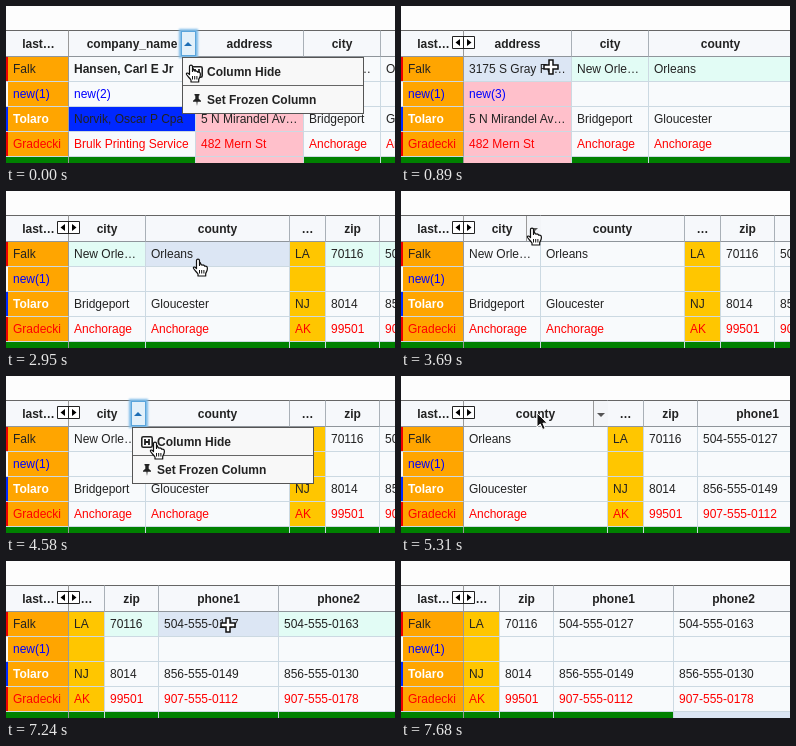
Animation of 389x157 px, one loop 8300 ms. Source, as an HTML page:

```html
<!DOCTYPE html>
<html lang="en">
<head>
<meta charset="utf-8">
<title>Hiding grid columns</title>
<style>
html, body { margin: 0; width: 100%; height: 100%; overflow: hidden; background: #fdfdfd; }
body { position: relative; font: 12px/25px "Liberation Sans", Arial, sans-serif; color: #222; }
#stage { position: absolute; left: 0; top: 0; width: 389px; height: 157px; overflow: hidden; }
#stage div { box-sizing: border-box; white-space: nowrap; }
#view { position: absolute; left: 63px; top: 24px; width: 326px; height: 133px; overflow: hidden; }
#strip { position: absolute; left: 0; top: 0; }
#frozen { position: absolute; left: 0; top: 24px; width: 63px; height: 133px; overflow: hidden; }
.col { position: absolute; top: 0; }
.head { height: 27px; line-height: 26px; text-align: center; font-weight: bold; background: #f6f8fb;
  border: solid #a9b0b7; border-width: 0 1px 1px 0; border-top: 1px solid #666; border-bottom-color: #8f959b; overflow: hidden; }
.cell { height: 25px; line-height: 25px; padding-left: 5px; background: #f8fafc; overflow: hidden;
  border: solid #ccd9e2; border-width: 0 1px 1px 0; }
#frozen .head, #frozen .cell { border-right-color: #999; }
.r1 { color: #00f; }
.r3 { color: #f00; }
.r4 { background: #008000; }
.rowHover { background: #e2fcf5; }
.cellHover { background: #dce6f4 !important; }
.edge { position: absolute; left: 0; width: 2px; height: 24px; }
#btn { position: absolute; top: 25px; width: 15px; height: 25px; background: #f3f5f8; border-left: 1px solid #999; }
#btn i { position: absolute; left: 3px; top: 12px; border: 4px solid transparent; border-top-color: #555; border-bottom: 0; }
#btn.open { background: #e2f0fa; border: 1px solid #5aa5dc; box-shadow: 0 0 2px 2px #7dbbe8; }
#btn.open i { left: 2px; top: 10px; border-top: 0; border-bottom: 4px solid #1b6db5; }
#menu { position: absolute; top: 51px; width: 182px; height: 57px; background: #f8f8f8; border: 1px solid #555;
  font-weight: bold; color: #222; }
#menu div { position: relative; height: 27px; line-height: 28px; padding-left: 24px; }
#menu div + div { border-top: 1px solid #666; }
#menu svg { position: absolute; left: 8px; top: 8px; }
#sizer { position: absolute; left: 51px; top: 30px; }
#cursor { position: absolute; left: 0; top: 0; overflow: visible; }
</style>
</head>
<body>
<div id="stage">
  <div id="view"><div id="strip"></div></div>
  <div id="frozen"></div>
  <svg id="sizer" width="23" height="13">
    <path d="M.5.5h22v12h-22zM11.500.5v12" fill="#fff" stroke="#222"/>
    <path d="M8 3v7L3.500 6.500zM15 3v7L19.500 6.500z"/>
  </svg>
  <div id="btn"><i></i></div>
  <div id="menu">
    <div><svg width="12" height="12"><rect x=".8" y=".8" width="10.400" height="10.400" rx="1.500" fill="#fff" stroke="#222" stroke-width="1.600"/><path d="M4 3v6M8 3v6M4 6h4" stroke="#222" stroke-width="1.800"/></svg>Column Hide</div>
    <div><svg width="12" height="12"><path d="M3.500 0h5v1.200l-.8.6v3l2.300 2v1H6.600L6 12l-.6-4.200H2v-1l2.300-2v-3l-.8-.6z" fill="#222"/></svg>Set Frozen Column</div>
  </div>
  <svg id="cursor" width="1" height="1">
    <g id="hand"><path d="M-1.500 1.500C-1.500-.3 1.500-.3 1.500 1.500V6.500C2-.0 2 5.500 4 6.200 5 5.700 6.300 6 6.700 7.200 8.500 6.800 9.400 7.800 9.400 9.500 9.400 12 8.200 13 7.700 14.500V17H0V15C-1.500 13-3.500 11-4.500 9.500-5 8.200-3.500 7.500-2.500 8.500L-1.500 9.500Z" fill="#fff" stroke="#111" stroke-width="1.200" stroke-linejoin="round"/><path d="M1.500 11v3.500M3.700 11v3.500M5.900 11v3.500" stroke="#111"/></g>
    <g id="cross"><path d="M-2-7h4v5h5v4h-5v5h-4v-5h-5v-4h5z" fill="#fff" stroke="#111" stroke-width="1.500"/></g>
    <g id="arrow"><path d="M0 0V14L3.300 11 5.700 16.500 8.200 15.400 5.900 10.200H10.400Z" fill="#111" stroke="#fff"/></g>
  </svg>
</div>
<script>
const LOOP = 8300, LEFT = 63, TOP = 50, ROW = 25;
const $ = id => document.getElementById(id);

const columns = [
  { name: "company_name", w: 127, rows: ["Hansen, Carl E Jr", "new(2)", "Norvik, Oscar P Cpa", "Brulk Printing Service"] },
  { name: "address", w: 108, bg: "#ffc0cb", rows: ["3175 S Gray Fe…", "new(3)", "5 N Mirandel Av…", "482 Mern St"] },
  { name: "city", w: 77, rows: ["New Orle…", "", "Bridgeport", "Anchorage"] },
  { name: "county", w: 144, rows: ["Orleans", "", "Gloucester", "Anchorage"] },
  { name: "…", w: 36, bg: "#ffc600", rows: ["LA", "", "NJ", "AK"] },
  { name: "zip", w: 54, rows: ["70116", "", "8014", "99501"] },
  { name: "phone1", w: 120, rows: ["504-555-0127", "", "856-555-0149", "907-555-0112"] },
  { name: "phone2", w: 120, rows: ["504-555-0163", "", "856-555-0130", "907-555-0178"] }
];
const last = { name: "last…", w: 63, bg: "#ffa500", rows: ["Falk", "new(1)", "Tolaro", "Gradecki"] };

// Each menu opens, then hides the first visible column as it closes.
const menus = [[0, 590], [1920, 2950], [4140, 4880], [6360, 7100]];

// time, pointer, hot spot
const moves = [
  [0, "hand", 185, 59], [140, "hand", 190, 59], [290, "hand", 196, 59],
  [740, "cross", 178, 62], [890, "cross", 150, 61], [1040, "arrow", 147, 46],
  [1180, "arrow", 150, 42], [1330, "arrow", 154, 40], [1480, "arrow", 158, 38], [1620, "hand", 161, 37],
  [2070, "hand", 167, 46], [2220, "hand", 176, 54], [2360, "hand", 187, 64], [2510, "hand", 192, 68],
  [3100, "cross", 180, 66], [3250, "cross", 158, 58], [3390, "arrow", 137, 43],
  [3540, "arrow", 132, 38], [3690, "hand", 131, 37],
  [4290, "hand", 133, 44], [4440, "hand", 140, 55], [4580, "hand", 149, 66], [4730, "hand", 151, 67],
  [5030, "cross", 150, 64], [5170, "cross", 144, 56], [5310, "arrow", 136, 37],
  [5460, "arrow", 158, 38], [5610, "arrow", 180, 38], [5760, "arrow", 195, 37], [5910, "hand", 199, 37],
  [6510, "hand", 201, 42], [6650, "hand", 208, 52], [6800, "hand", 214, 60], [6950, "hand", 216, 61],
  [7240, "cross", 222, 64], [7390, "cross", 262, 68], [7530, "cross", 318, 128], [7680, "cross", 325, 172]
];

function add(parent, cls, text = "") {
  const el = document.createElement("div");
  el.className = cls;
  el.textContent = text;
  return parent.appendChild(el);
}

function build(col, parent, x) {
  const box = add(parent, "col");
  box.style.left = x + "px";
  box.style.width = col.w + "px";
  col.x = x;
  col.head = add(box, "head", col.name);
  col.cells = [...col.rows, ""].map((text, r) => {
    const cell = add(box, "cell r" + r, text);
    // The green row covers column colours, except for the pink addresses.
    if (col.bg && (r < 4 || col.name === "address")) cell.style.background = col.bg;
    return cell;
  });
}

let width = 0;
for (const col of columns) {
  build(col, $("strip"), width);
  width += col.w;
}
build(last, $("frozen"), 0);
last.head.style.paddingLeft = "3px";
for (const cell of last.cells) cell.style.paddingLeft = "7px";
last.cells[2].style.cssText += "color:#fff;font-weight:bold";
columns[0].cells[0].style.fontWeight = "bold";
columns[0].cells[2].style.background = "#0028ff";
["#e00", "#f8fafc", "#0028ff", "#e00"].forEach((color, r) => {
  const edge = add($("frozen"), "edge");
  edge.style.cssText = `top:${27 + r * ROW}px;background:${color}`;
});

function show(el, on) { el.style.display = on ? "" : "none"; }

function draw(t) {
  const hidden = menus.filter(m => t >= m[1]).length;
  const open = menus.some(m => t >= m[0] && t < m[1]);
  const [, kind, x, y] = moves.filter(m => t >= m[0]).pop();
  const first = columns[hidden], right = LEFT + first.w;

  $("strip").style.left = -first.x + "px";
  show($("sizer"), hidden > 0);
  show($("menu"), open);
  $("menu").style.left = right - 14 + "px";
  show($("btn"), open || y < TOP);
  $("btn").className = open ? "open" : "";
  $("btn").style.left = right - 15 + "px";

  const row = open ? -1 : Math.floor((y - TOP) / ROW);
  const at = x - LEFT + first.x;
  for (const col of columns) {
    const over = at >= col.x && at < col.x + col.w;
    col.cells.forEach((cell, r) => {
      cell.classList.toggle("rowHover", r === row && r < 4);
      cell.classList.toggle("cellHover", r === row && over);
    });
  }

  for (const id of ["hand", "cross", "arrow"]) show($(id), id === kind);
  $("cursor").style.transform = `translate(${x}px, ${y}px)`;
}

const start = performance.now();
function tick() {
  draw((performance.now() - start) % LOOP);
  requestAnimationFrame(tick);
}
tick();
</script>
</body>
</html>
```
